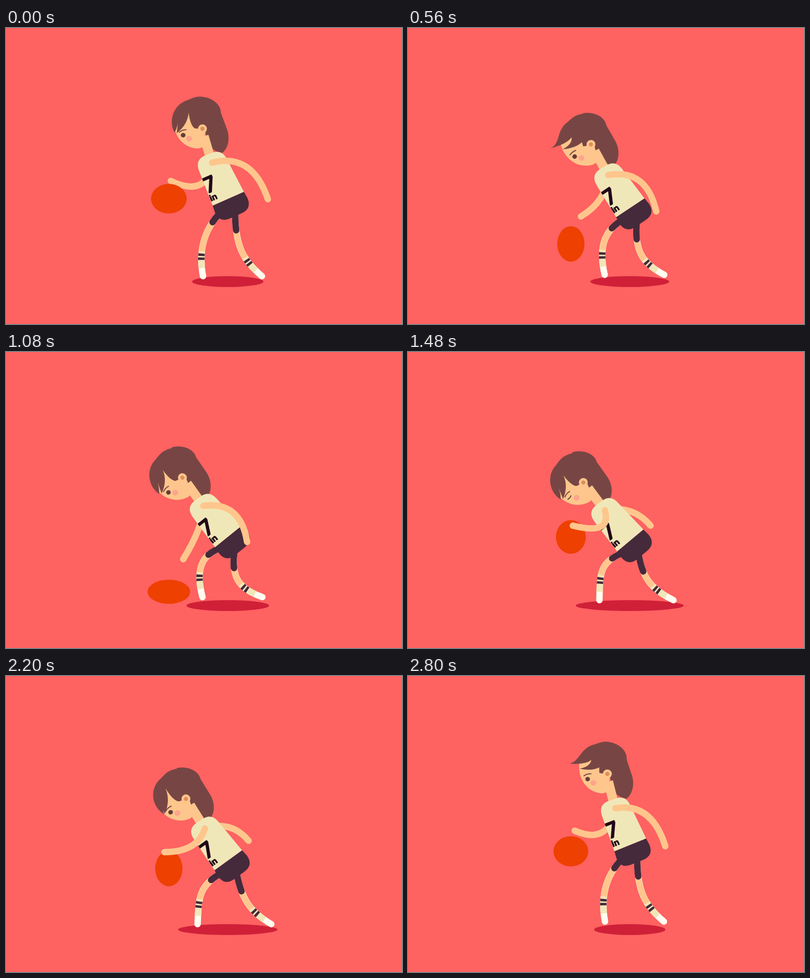
An HTML page with a canvas for the animation above (2840 ms loop, 800 by 600 pixels).

```html
<!DOCTYPE html>
<html>
<head>
<meta charset="utf-8">
<title>Dribble</title>
<style>
html, body { margin: 0; width: 100%; height: 100%; overflow: hidden; background: #fe6261; }
canvas { display: block; }
</style>
</head>
<body>
<canvas id="stage" width="800" height="600"></canvas>
<script>
const ctx = document.getElementById('stage').getContext('2d');
const STEP = 40, LOOP = 71;
const SKIN = '#fec68c', HAIR = '#774644', CREAM = '#f0e7b9', DARK = '#452a3b', INK = '#220818';

const clamp = (v, lo, hi) => Math.min(hi, Math.max(lo, v));
const ease = k => (1 - Math.cos(Math.PI * clamp(k, 0, 1))) / 2;
const mix = (a, b, k) => a + (b - a) * k;

// Eased value of a track of [time, ...values] keys
function track(keys, t) {
  const i = Math.max(1, keys.findIndex(key => key[0] >= t));
  const a = keys[i - 1], b = keys[i];
  const k = ease((t - a[0]) / (b[0] - a[0]));
  return a.slice(1).map((v, j) => mix(v, b[j + 1], k));
}

// Hip height over the loop
const HIP = [[0, 346], [5, 374], [11, 346], [16, 374], [22, 346], [27, 374], [28.5, 384], [32.5, 314],
  [37, 382], [41, 390], [46.2, 368], [51.2, 390], [56.9, 368], [62, 390], [66.5, 314], [71, 346]];
const STANCE = [[0, 0], [28, 0], [35, 1], [62, 1], [70, 0], [71, 0]];

// Arm poses: near hand, near bend, far hand, far bend
const farTop = [529, 347, 497, 252, 333, 310, 405, 345];
const farLow = [487, 385, 474, 302, 358, 420, 398, 355];
const farRise = [487, 372, 487, 292, 330, 357, 380, 332];
const nearTop = [333, 352, 412, 372, 490, 352, 455, 310];
const nearLow = [352, 424, 402, 378, 488, 366, 455, 318];
const nearRise = [320, 357, 387, 357, 490, 334, 455, 292];
const leap = [450, 330, 455, 285, 365, 340, 405, 335];
const ARMS = [[0, farTop], [5, farLow], [8, farRise], [11, farTop], [16, farLow], [19, farRise],
  [22, farTop], [27, farLow], [32, leap], [37, nearTop], [41, nearLow], [44.4, nearRise],
  [46.5, nearTop], [51.5, nearLow], [55, nearRise], [57, nearTop], [62, nearLow], [66.5, leap],
  [71, farTop]].map(([t, pose]) => [t, ...pose]);

const BALL_TOPS = [0, 11, 22, 35.5, 46.2, 56.9, 71];

function ballDrop(t) {
  const i = BALL_TOPS.findIndex(top => top > t);
  const a = BALL_TOPS[i - 1], b = BALL_TOPS[i];
  const rise = b - a > 12 ? 6 : 5;
  return Math.min(ease((t - a) / 5), ease((b - t) / rise));
}

function ellipse(x, y, rx, ry, color) {
  ctx.fillStyle = color;
  ctx.beginPath();
  ctx.ellipse(x, y, rx, ry, 0, 0, Math.PI * 2);
  ctx.fill();
}

function shape(d, color) {
  ctx.fillStyle = color;
  ctx.fill(new Path2D(d));
}

function stroke(d, color, width, cap = 'round', dash = []) {
  ctx.strokeStyle = color;
  ctx.lineWidth = width;
  ctx.lineCap = cap;
  ctx.setLineDash(dash);
  ctx.stroke(new Path2D(d));
  ctx.setLineDash([]);
}

function turned(x, y, degrees, draw) {
  ctx.save();
  ctx.translate(x, y);
  ctx.rotate(degrees * Math.PI / 180);
  draw();
  ctx.restore();
}

// Point at (x, y) turned by an angle around (ox, oy)
function place(ox, oy, degrees, x, y) {
  const a = degrees * Math.PI / 180, c = Math.cos(a), s = Math.sin(a);
  return [ox + x * c - y * s, oy + x * s + y * c];
}

function drawLeg(hip, c1, c2, foot, shorts) {
  const up = `M${foot}C${c2} ${c1} ${hip}`;
  stroke(up, '#fffdf0', 13);
  stroke(up, SKIN, 12, 'butt', [0, 17, 999, 0]);
  stroke(up, CREAM, 13, 'butt', [0, 17, 34, 999]);
  stroke(up, DARK, 13, 'butt', [0, 33, 5, 3, 5, 999]);
  stroke(`M${hip}C${c1} ${c2} ${foot}`, DARK, 13, 'round', [shorts, 999]);
}

function drawLegs(y, stance) {
  const u = Math.max(0, (y - 346) / 27.5);
  const lift = Math.max(0, 346 - y) * 1.4;
  const heel = 503 - 6 * u * u * (1 - stance) - lift;
  drawLeg([440 + 4 * stance, y + 21],
    [400 - 5 * u - 8 * stance, 405 + 3 * u + 16 * stance - lift],
    [388 - 6 * u + 8 * stance, 450 - 10 * u + 8 * stance - lift],
    [398 - u - 10 * stance, heel], 35);
  drawLeg([463 + 2 * stance, y + 21],
    [462 - 10 * u + 23 * stance, 440 + 15 * u - 4 * stance - lift],
    [478 - 8 * u + 22 * stance, 470 + 10 * u - 3 * stance - lift],
    [517 + u + 18 * stance, heel], 43);
}

function drawFace(swing, eyeOpen) {
  const p = (x0, y0, x1, y1) => `${mix(x0, x1, swing)},${mix(y0, y1, swing)} `;
  shape('M-58,-18C-59,15 -38,40 -8,40L2,37L6,5V-40H-50Z', SKIN);
  const tip = p(-56, 8, -78, -16);
  shape('M' + tip + 'C' + p(-70, -16, -58, -20) + '-58,-50 -30,-58C-15,-65 -10,-65 -6,-65' +
    'C18,-65 37,-50 37,-33L42,-5L8,10L0,0Q-10,0 -16,-1Q' + p(-25, -8, -17, -4) + p(-28, -33, -17, -12) +
    'Q' + p(-30, -8, -32, -3) + p(-52, 9, -57, -7) + 'Q' + p(-50, -8, -36, -12) + p(-48, -25, -34, -26) +
    'Q' + p(-49, -5, -46, -15) + tip + 'Z', HAIR);
  stroke('M-47,7Q-41,2 -33,2', HAIR, 2);
  if (eyeOpen) ellipse(-39, 13, 4.7, 4.5, '#653b3b');
  else stroke('M-44,14Q-39,14 -35,11', '#653b3b', 2);
  ellipse(-27, 20, 6, 5.7, '#fda58c');
  ellipse(0, 0, 9, 9, SKIN);
  ellipse(0, 0, 4.2, 4.2, '#dc8f5c');
}

function drawTorso() {
  const shirt = 'M-34.5,0L-31,-75Q-30,-99 -8,-99L10,-98Q29,-96 30,-75L34.5,0Z';
  shape('M-34.5,0L-36,15Q-36,38 -13,38H12Q36,38 36,14L34.5,0Z', DARK);
  shape(shirt, CREAM);
  ctx.save();
  ctx.clip(new Path2D(shirt));
  ctx.fillStyle = ctx.strokeStyle = INK;
  ctx.lineJoin = 'round';
  const print = (text, font, y, weight) => {
    ctx.font = font + ' Inter, sans-serif';
    ctx.lineWidth = weight;
    ctx.fillText(text, -34, y);
    ctx.strokeText(text, -34, y);
  };
  print('7', '400 42px', -27, 3);
  print('in', '700 17px', -9, 1);
  ctx.restore();
}

function drawBall(t) {
  const drop = ballDrop(t);
  const squash = drop < .5 ? 1 - ease(drop / .33) : 0;
  const flat = ease((drop - .7) / .3);
  ellipse(329, mix(346, 486, drop), 27.5 + 8.5 * squash + 15.5 * flat, 36 - 6 * squash - 11.5 * flat, '#ee4000');
}

function draw(t) {
  const [y] = track(HIP, t), [stance] = track(STANCE, t);
  const speed = (track(HIP, Math.min(LOOP, t + .05))[0] - track(HIP, Math.max(0, t - .05))[0]) * 10;
  const swing = clamp(speed / 7.2, -.15, 1.1);
  const lean = Math.max(-8, (y - 346) * (.63 - .11 * stance));
  const tilt = -24 - .85 * lean;
  const [nx, ny, nbx, nby, fx, fy, fbx, fby] = track(ARMS, t);
  const ear = place(449, y, -20.2 - lean, 0, -151);
  const shoulder = place(449, y, tilt, 0, -80);
  const nape = place(...ear, -1.6 * lean, 3, 15);
  const collar = place(449, y, tilt, 0, -85);

  ctx.fillStyle = '#fe6261';
  ctx.fillRect(0, 0, 800, 600);
  ellipse(448, 514, 72 + (y < 346 ? 0 : (y - 346) * (.41 + .62 * stance)), 11, '#d02038');
  drawLegs(y, stance);
  stroke(`M${shoulder}Q${fbx},${fby} ${fx},${fy}`, SKIN, 13);
  turned(...ear, -.8 * lean, () =>
    shape('M-6,-65C18,-65 37,-50 37,-33L50,2C56,20 52,40 40,49Q18,45 14,31L5,5Z', HAIR));
  stroke(`M${nape}L${collar}`, SKIN, 19, 'butt');
  turned(...ear, -1.6 * lean, () => drawFace(swing, Math.abs(t - 37) > 1.5));
  turned(449, y, tilt, drawTorso);
  drawBall(t);
  stroke(`M${shoulder}Q${nbx},${nby} ${nx},${ny}`, SKIN, 13);
}

function tick() {
  draw(Math.floor(performance.now() / STEP) % LOOP);
  requestAnimationFrame(tick);
}
tick();
</script>
</body>
</html>
```
